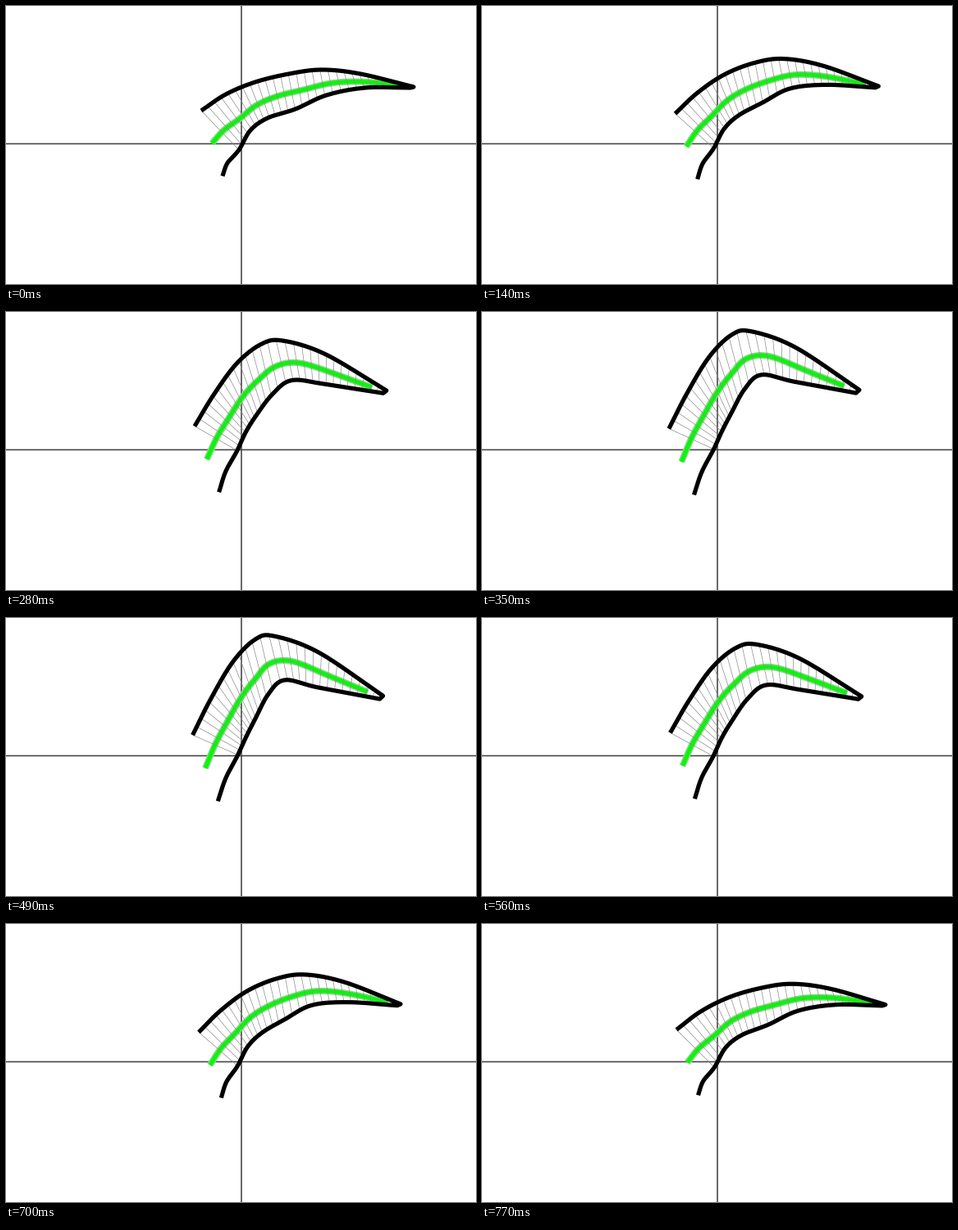
Recreate the animation shown at these times as a matplotlib script. Size 573 px wide and 340 px high, loop 840 ms.

```python
import numpy as np
import matplotlib.pyplot as plt
from matplotlib.animation import FuncAnimation
from matplotlib.collections import LineCollection

W, H, DPI = 573, 340, 100
STEPS, INTERVAL = 12, 70
PX = 72 / DPI
RIBS = 29
PULL = 7        # how far the tip is drawn in half way through the bend
TAIL = 2        # control points of the lower edge that carry no ribs

# Each edge of the fin: a few key points when relaxed and when bent.
UPPER = (
    [(238, 128), (268, 108), (304, 93), (345, 83), (385, 78), (432, 83), (497, 99)],
    [(227, 144), (248, 100), (275, 52), (302, 23), (325, 19), (380, 40), (459, 95)],
)
LOWER = (
    [(264, 208), (270, 192), (284, 176), (298, 152), (319, 137),
     (353, 126), (391, 109), (438, 100), (493, 100)],
    [(258, 225), (268, 196), (283, 167), (293, 145), (304, 122),
     (319, 91), (338, 74), (378, 84), (455, 99)],
)


def pose(edge, s):
    """Key points for s from 1 (relaxed) to -1 (bent)."""
    relaxed, bent = np.array(edge, float)
    points = ((1 + s) * relaxed + (1 - s) * bent) / 2
    points[:, 0] -= PULL * (1 - s * s) * np.linspace(0, 1, len(points))
    return points


def spline(points, t):
    """Catmull-Rom curve through points, t counted in key points."""
    p = np.vstack([2 * points[0] - points[1], points,
                   2 * points[-1] - points[-2]])
    i = np.minimum(t.astype(int), len(points) - 2)
    f = (t - i)[:, None]
    p0, p1, p2, p3 = p[i], p[i + 1], p[i + 2], p[i + 3]
    return 0.5 * (2 * p1 + (p2 - p0) * f
                  + (2 * p0 - 5 * p1 + 4 * p2 - p3) * f ** 2
                  + (3 * p1 - p0 - 3 * p2 + p3) * f ** 3)


def along(points, fraction):
    return spline(points, fraction * (len(points) - 1))


def even_steps(points, count):
    """Values of t that divide the curve into equal lengths."""
    t = np.linspace(0, len(points) - 1, 200)
    steps = np.hypot(*np.diff(spline(points, t), axis=0).T)
    length = np.append(0, np.cumsum(steps))
    return np.interp(np.linspace(0, length[-1], count), length, t)


fig = plt.figure(figsize=(W / DPI, H / DPI), dpi=DPI, facecolor="white")
ax = fig.add_axes([0, 0, 1, 1])
ax.set_xlim(0, W)
ax.set_ylim(H, 0)
ax.axis("off")

for xs, ys in (([287, 287], [0, H]), ([0, W], [168.5, 168.5])):
    ax.plot(xs, ys, color="#444444", lw=1.6 * PX, snap=False, zorder=1)

ribs = LineCollection([], colors="#8c8c8c", linewidths=0.7 * PX, zorder=4)
ax.add_collection(ribs)


def stroke(color, width, z):
    return ax.plot([], [], color=color, lw=width * PX, zorder=z,
                   solid_capstyle="butt", solid_joinstyle="round")[0]


halo = stroke("#8ad88a", 8, 2)
core = stroke("#0cf40c", 5, 3)
outline = stroke("black", 5.2, 5)

whole = np.linspace(0, 1, 80)


def update(k):
    s = np.cos(np.radians(360 * k / STEPS - 3))
    upper, lower = pose(UPPER, s), pose(LOWER, s)

    t = even_steps(upper, RIBS)
    ribs.set_segments(np.stack([spline(upper, t), spline(lower, t + TAIL)], axis=1))

    middle = (along(upper, whole * 0.97) + along(lower, whole * 0.97)) / 2
    for line in (halo, core):
        line.set_data(*middle.T)
    outline.set_data(*np.vstack([along(upper, whole), along(lower, whole[::-1])]).T)
    return ribs, halo, core, outline


anim = FuncAnimation(fig, update, frames=STEPS, interval=INTERVAL,
                     repeat=True, repeat_delay=0)
plt.show()
```
